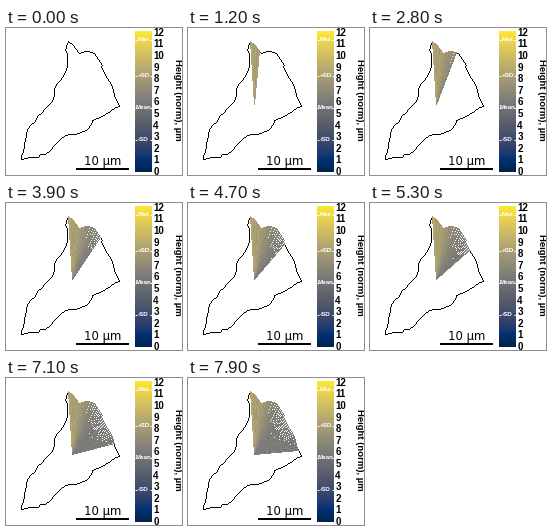
Write a matplotlib script that moves like this. It is 176x147 px and loops after 8000 ms.

```python
import numpy as np
import matplotlib as mpl
import matplotlib.pyplot as plt
from matplotlib.animation import FuncAnimation

W, H, DPI = 176, 147, 100
FRAMES, STEP_MS = 80, 100
PX = 72 / DPI
CENTER = (66, 76)
PAUSES = (6, 46)
CMAP = mpl.colormaps["cividis"]
rng = np.random.default_rng(4)

# Corners of the cell border, clockwise: the side the ray sweeps, then the rest
SWEPT = [(62, 13), (66, 16), (73, 25), (79, 23), (82, 23), (88, 25), (90, 28),
         (96, 37), (95, 38), (96, 41), (101, 50), (106, 58), (108, 67), (110, 72)]
REST = [(110, 72), (113, 78), (99, 86), (86, 92), (80, 102), (55, 110),
        (39, 126), (15, 131), (20, 106), (25, 96), (47, 71), (48, 60),
        (60, 41), (60, 18), (62, 13)]


def segment(a, b):
    """Pixels on a straight line, one per step along its longer axis."""
    a, b = np.array(a), np.array(b)
    t = np.linspace(0, 1, np.abs(b - a).max() + 1)[:, None]
    return np.floor(a + (b - a) * t + 0.5).astype(int)


def chain(points):
    parts = [segment(a, b)[1:] for a, b in zip(points, points[1:])]
    return np.vstack([[points[0]], *parts])


def roughen(points):
    """Add a slightly displaced point every few pixels."""
    out = []
    for a, b in zip(points, points[1:]):
        line = segment(a, b)
        middle = line[4:-3:4]
        out += [tuple(line[0])]
        out += [tuple(p) for p in middle + rng.integers(-1, 2, middle.shape)]
    return out + [points[-1]]


def paint(canvas, pixels, color):
    canvas[pixels[:, 1], pixels[:, 0]] = color


def ray_color(end):
    dx, dy = end[0] - CENTER[0], end[1] - CENTER[1]
    angle = np.degrees(np.arctan2(dx, -dy))
    level = 0.5 + 0.21 / (1 + np.exp((angle - 16) / 7))
    return CMAP(level + 0.025 * np.sin(1.7 * angle) + rng.normal(0, 0.015))


ends = chain(SWEPT)
rays = [(segment(CENTER, end), ray_color(end)) for end in ends]
outline = np.vstack([ends, chain(roughen(REST))])


def cell(step):
    canvas = np.zeros((H, W, 4))
    paint(canvas, outline, (0, 0, 0, 1))
    count = step - sum(step >= p for p in PAUSES)
    for pixels, color in rays[:count]:
        paint(canvas, pixels, color)
    return canvas


def label(x, y, text, size, **style):
    style = {"ha": "center", "va": "center", "family": "Liberation Sans", **style}
    ax.text(x, y, text, fontsize=size * PX, **style)


def hline(x0, x1, y, width, color):
    ax.plot([x0, x1], [y, y], color=color, lw=width * PX, solid_capstyle="butt")


fig = plt.figure(figsize=(W / DPI, H / DPI), dpi=DPI, facecolor="white")
ax = fig.add_axes([0, 0, 1, 1])
ax.axis("off")
cell_image = ax.imshow(cell(0), extent=(0, W, H, 0), interpolation="nearest")

# Scale bar
hline(70, 123, 141, 2, "black")
label(97, 137.5, "10 µm", 11.6, va="baseline", family="DejaVu Sans")

# Height scale
LEFT, RIGHT, TOP, BOTTOM = 129, 146, 3, 144
ax.imshow(np.linspace(1, 0, 256)[:, None], cmap=CMAP, aspect="auto",
          extent=(LEFT, RIGHT, BOTTOM, TOP))
for n in range(13):
    label(147.3, 143 - n * 11.6, str(n), 9.8, weight="bold", ha="left",
          va="center_baseline")
for n, text in enumerate(["-SD", "Mean", "+SD", "Max"]):
    y = 111.5 - n * 32
    if text == "Max":
        y = 11.5
    label(137.5, y, text, 6.3, color="white", weight="bold")
    hline(LEFT, LEFT + 2, y, 1, "white")
    hline(RIGHT - 2, RIGHT, y, 1, "white")
label(171.5, 72, "Height (norm), µm", 9.5, weight="bold", rotation=270)

ax.set_aspect("auto")
ax.set_xlim(0, W)
ax.set_ylim(H, 0)


def update(step):
    cell_image.set_data(cell(step))
    return [cell_image]


anim = FuncAnimation(fig, update, frames=FRAMES, interval=STEP_MS,
                     repeat=True, repeat_delay=0, blit=False)
plt.show()
```
